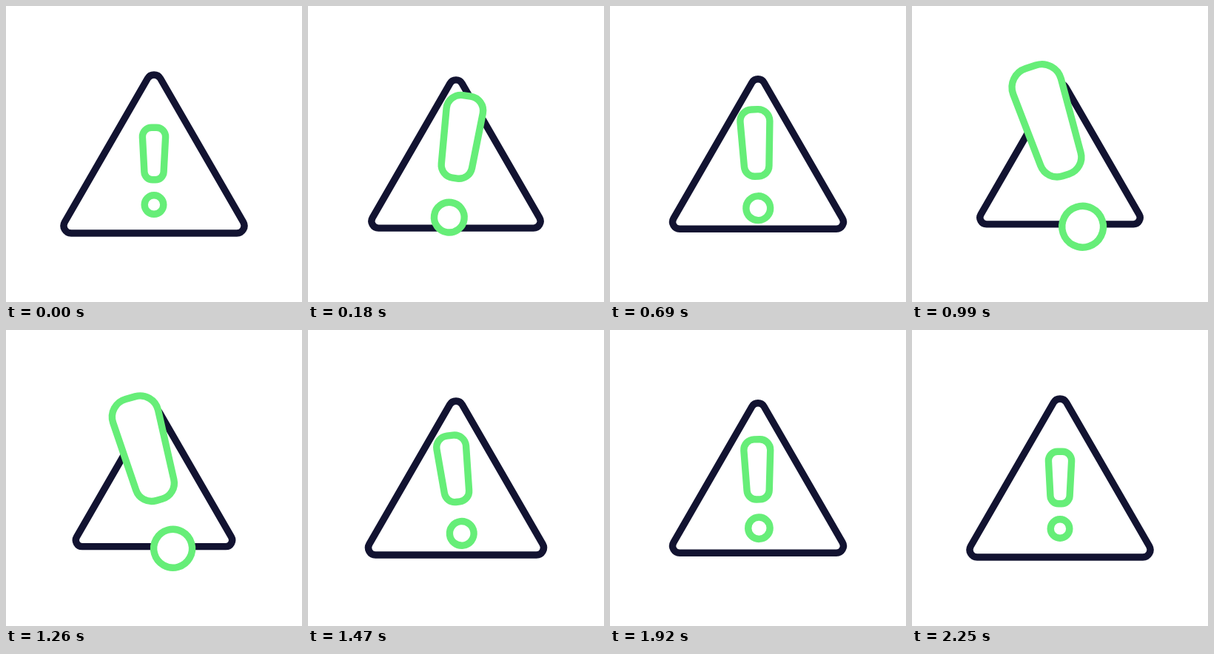
Recreate the animation shown at these times as an HTML page. Size 400x400 px, loop 2.28 s.

```html
<!DOCTYPE html>
<html lang="en">
<head>
<meta charset="utf-8">
<title>Warning</title>
<style>
  html, body { margin: 0; width: 100%; height: 100%; overflow: hidden; background: #fff; }
  svg { display: block; width: 100vw; height: 100vh; }
  path, circle { stroke-width: 9.4; stroke-linejoin: round; vector-effect: non-scaling-stroke; }
  #sign { fill: none; stroke: #121331; }
  #mark { fill: #fff; stroke: #66ee78; }
</style>
</head>
<body>
<svg viewBox="0 0 400 400">
  <g id="sign">
    <path d="M-112 107 A10 10 0 0 1 -120.66 92 L-8.66 -102 A10 10 0 0 1 8.66 -102 L120.66 92 A10 10 0 0 1 112 107 Z"/>
  </g>
  <g id="mark">
    <path d="M-3.3 -58.8 H3.3 A12.3 12.3 0 0 1 15.6 -46 L13.1 1.3 A11 11 0 0 1 2.1 11.8 H-2.1 A11 11 0 0 1 -13.1 1.3 L-15.6 -46 A12.3 12.3 0 0 1 -3.3 -58.8 Z"/>
    <circle cy="45.5" r="12.8"/>
  </g>
</svg>
<script>
const LOOP = 2280;
const CENTER = 200;
const sign = document.getElementById('sign');
const mark = document.getElementById('mark');

const ease = u => u * u * (3 - 2 * u);

// Eases from one value to the next, resting at each beat.
const track = (beats, values) => t => {
  const next = beats.findIndex(b => b > t);
  if (next < 0) return values[values.length - 1];
  const i = Math.max(0, next - 1);
  const u = Math.max(0, (t - beats[i]) / (beats[i + 1] - beats[i]));
  return values[i] + (values[i + 1] - values[i]) * ease(u);
};

// Swell, dip, swell again, then settle.
const BEATS = [0, 400, 690, 1090, 1650, 1920, 2250];
const markScale = track(BEATS, [1, 2.38, 1.28, 2.34, 0.94, 1.15, 1]);
const markY = track(BEATS, [223, 202, 215, 202, 222, 215.4, 223]);

// The mark swings right, then left, and returns upright.
const tilt = track([0, 400, 930, 1140, 1650, 2250], [0, 19.2, -18, -18, -2.5, 0]);
const sway = t => 0.3 * (tilt(t) - tilt(t - 60));

// The sign gives way to the mark, waits, and pops out.
const signScale = track([0, 390, 690, 1140, 1330, 1650, 1920, 2250],
  [1, 0.855, 0.946, 0.866, 0.866, 1.122, 0.946, 1]);

function draw(t) {
  sign.setAttribute('transform', `translate(${CENTER} ${CENTER}) scale(${signScale(t)})`);
  mark.setAttribute('transform',
    `translate(${CENTER + sway(t)} ${markY(t)}) rotate(${tilt(t)}) scale(${markScale(t)})`);
}

function tick() {
  draw(performance.now() % LOOP);
  requestAnimationFrame(tick);
}
draw(0);
requestAnimationFrame(tick);
</script>
</body>
</html>
```
